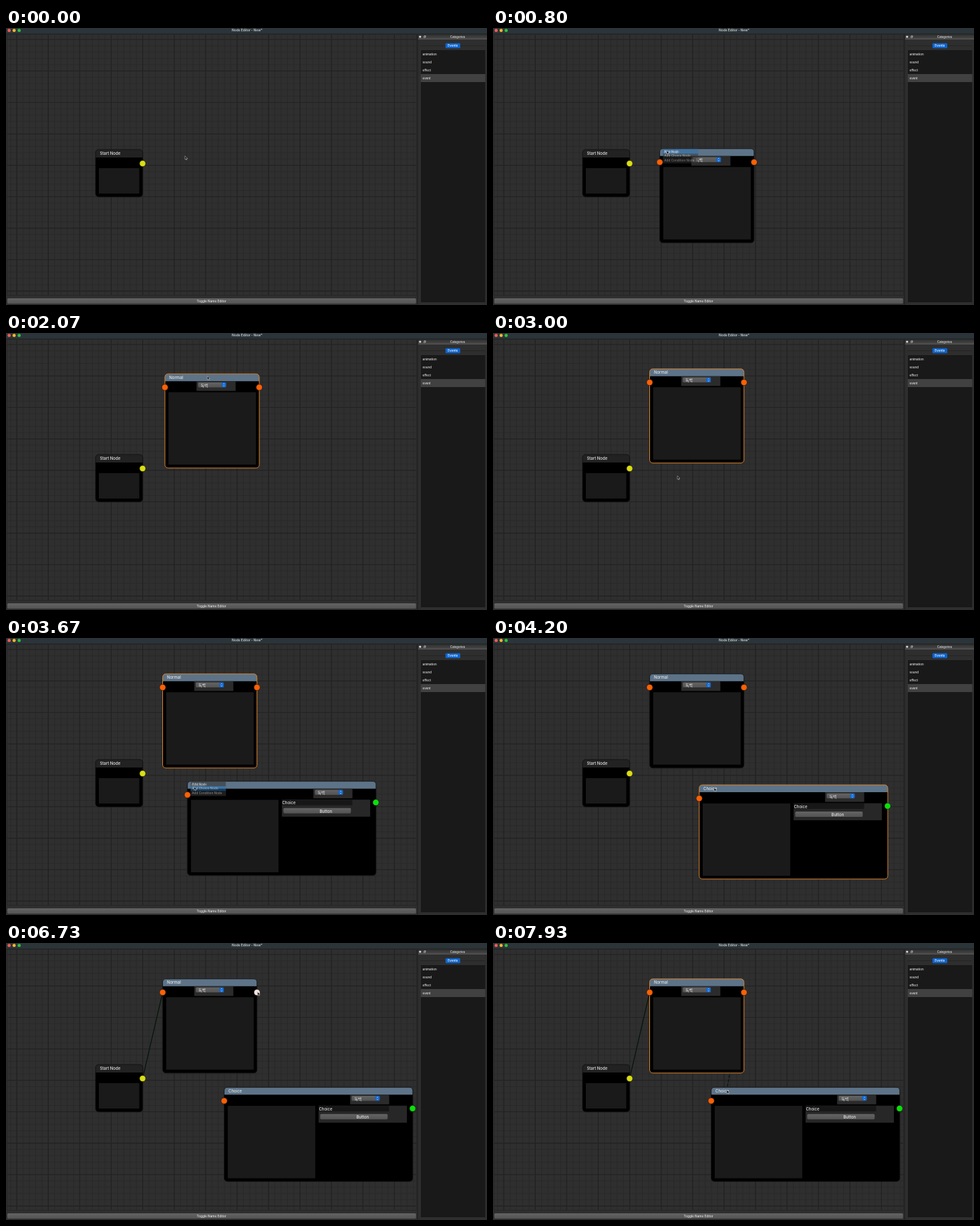
These frames come from a looping animation (720 by 415 pixels, 8 s). An HTML page:

```html
<!DOCTYPE html>
<html lang="en">
<head>
<meta charset="utf-8">
<title>Node Editor</title>
<style>
html, body { margin: 0; width: 100%; height: 100%; overflow: hidden; background: #2e2e2e; }
svg { display: block; width: 100vw; height: 100vh; }
text { font-family: Inter, "Noto Sans CJK KR", "Noto Sans CJK", sans-serif; font-size: 6px; font-weight: 500; fill: #e8e8e8; white-space: pre; }
.small { font-size: 4.7px; }
.mid { text-anchor: middle; }
.field { fill: #1a1a1a; }
.frame { fill: none; stroke: #111; stroke-width: .8; }
.selected .frame { stroke: #d9832b; stroke-width: 1; }
.socket { stroke: #171717; stroke-width: .6; }
.hover { fill: #fbe4df; }
.edge { stroke: #04140a; stroke-width: 1.2; }
</style>
</head>
<body>
<svg viewBox="0 0 720 415" preserveAspectRatio="none">
  <defs>
    <linearGradient id="button" x2="0" y2="1">
      <stop stop-color="#646464"/><stop offset="1" stop-color="#535353"/>
    </linearGradient>
    <linearGradient id="dock" x2="0" y2="1">
      <stop stop-color="#303030"/><stop offset="1" stop-color="#4c4c4c"/>
    </linearGradient>
    <clipPath id="view"><rect x="2" y="10" width="612" height="390"/></clipPath>
    <g id="combo">
      <rect width="58.5" height="14.5" fill="#2b2b2b"/>
      <rect x="2.3" y="1.7" width="42" height="7.6" rx="1.6" fill="url(#button)"/>
      <rect x="37.6" y="1.9" width="6.6" height="7.2" rx="1.5" fill="#0f65cf"/>
      <path d="M39.7 4.7l1.2-1.3 1.2 1.3M39.7 6.3l1.2 1.3 1.2-1.3" fill="none" stroke="#fff" stroke-width=".6"/>
      <text x="6.3" y="8.7" style="font-size:5.8px">독백</text>
    </g>
  </defs>

  <rect width="720" height="415" fill="#2e2e2e"/>
  <g clip-path="url(#view)">
    <rect x="2" y="10" width="612" height="390" fill="#2f2f2f"/>
    <path id="minor" stroke="#282828" stroke-width=".65"/>
    <path id="major" stroke="#222" stroke-width="1.1"/>
  </g>
  <path d="M1.5 400V9.5H614.5V400.5H1.5" fill="none" stroke="#262626"/>

  <line id="firstEdge" class="edge" x1="204.5" y1="203"/>
  <line id="secondEdge" class="edge" x1="375.5" y1="74" stroke-dasharray="4.6 2"/>

  <g id="start" transform="translate(134 182)">
    <rect width="70.7" height="71" rx="4.7"/>
    <path d="M0 12V4.7Q0 0 4.7 0H66Q70.7 0 70.7 4.7V12Z" fill="#222"/>
    <rect class="field" x="5" y="28" width="60.5" height="38"/>
    <rect class="frame" width="70.7" height="71" rx="4.7"/>
    <text x="6.4" y="8.2">Start Node</text>
    <circle id="startOut" class="socket" cx="70.5" cy="21" r="4.6" fill="#d9de12"/>
  </g>

  <g id="normal">
    <rect width="141.2" height="141" rx="4.7"/>
    <path d="M0 11V4.7Q0 0 4.7 0H136.5Q141.2 0 141.2 4.7V11Z" fill="#5d7388"/>
    <rect class="field" x="5.3" y="27.5" width="131" height="108.5"/>
    <use href="#combo" x="47.3" y="11"/>
    <rect class="frame" width="141.2" height="141" rx="4.7"/>
    <text x="6.4" y="7.6">Normal</text>
    <circle class="socket" cx="0" cy="20.2" r="4.6" fill="#fe6005"/>
    <circle id="normalOut" class="socket" cx="141.2" cy="20.2" r="4.6" fill="#fe6005"/>
  </g>

  <g id="choice">
    <rect width="282.3" height="141" rx="4.7"/>
    <path d="M0 11V4.7Q0 0 4.7 0H277.6Q282.3 0 282.3 4.7V11Z" fill="#5d7388"/>
    <rect class="field" x="5.3" y="27.8" width="131" height="108.5"/>
    <use href="#combo" x="188.5" y="11"/>
    <rect x="141.3" y="27.5" width="132.2" height="25.5" fill="#272727"/>
    <rect x="141.3" y="28" width="105.5" height="8" fill="#171717"/>
    <rect x="143.7" y="40" width="101" height="8" rx="1.6" fill="url(#button)"/>
    <rect class="frame" width="282.3" height="141" rx="4.7"/>
    <text x="6.4" y="7.6">Choice</text>
    <text x="141.8" y="34.7">Choice</text>
    <text class="mid" x="207.2" y="47">Button</text>
    <circle class="socket" cx="0" cy="20.3" r="4.6" fill="#fe6005"/>
    <circle class="socket" cx="282" cy="31.7" r="4.6" fill="#0be00b"/>
  </g>

  <g id="menu">
    <rect width="52.5" height="21.8" fill="#343434" stroke="#4a4a4a" stroke-width=".4"/>
    <rect id="highlight" width="52.5" height="6.8" fill="#2673b8"/>
    <text class="small" x="1.8" y="6">Add Node</text>
    <text class="small" x="1.8" y="12.8">Add Choice Node</text>
    <text class="small" x="1.8" y="19.5">Add Condition Node</text>
  </g>

  <rect width="720" height="8.5" fill="#2b3539"/>
  <rect y="8.5" width="720" height="1" fill="#1f2426"/>
  <circle cx="4.7" cy="3.7" r="2.4" fill="#fc5b53"/>
  <circle cx="12.2" cy="3.7" r="2.4" fill="#f8b72d"/>
  <circle cx="19.7" cy="3.7" r="2.4" fill="#2bc440"/>
  <text class="mid" x="361" y="5.3" style="font-size:4.9px;font-weight:700;fill:#b9bfc1">Node Editor - New*</text>

  <rect x="2" y="405" width="611.8" height="8" rx="1.6" fill="url(#button)"/>
  <text class="small mid" x="307.6" y="410.7">Toggle Name Editor</text>

  <rect x="615.5" y="9.5" width="1" height="405.5" fill="#1c1c1c"/>
  <rect x="617" y="10" width="103" height="7" fill="url(#dock)"/>
  <rect x="617" y="16.5" width="103" height=".6" fill="#666"/>
  <rect x="618.5" y="11.7" width="2.7" height="2.7" rx=".5" fill="#ddd"/>
  <path d="M625.5 12.5h2v2h-2zM626.2 12.3v-.7h2v2h-.6" fill="none" stroke="#ddd" stroke-width=".5"/>
  <text class="mid" x="676" y="14.8" style="font-size:4.2px">Categories</text>
  <rect x="620" y="26.3" width="96.5" height=".8" fill="#222"/>
  <rect x="657.8" y="22.8" width="22.2" height="7.4" rx="1.5" fill="#0e64cc"/>
  <text class="small mid" x="668.8" y="28.2" style="fill:#fff">Events</text>
  <rect x="620.8" y="32.8" width="97" height="378.5" fill="#191919" stroke="#3a3a3a" stroke-width=".5"/>
  <rect x="621" y="69" width="96.6" height="12" fill="#414141"/>
  <g id="list"></g>

  <path id="cursor" d="M0 0V5.2L1.2 4.1 2 6 2.9 5.6 2.1 3.8H3.8Z" fill="#050505" stroke="#ddd" stroke-width=".5"/>
</svg>
<script>
const $ = id => document.getElementById(id);
const LOOP = 8000;

function gridPath(step) {
  let d = '';
  for (let x = 16.2 - 47.1; x < 614; x += step) d += `M${x} 10V400`;
  for (let y = 17.3 - 47.1; y < 400; y += step) d += `M2 ${y}H614`;
  return d;
}
$('minor').setAttribute('d', gridPath(9.42));
$('major').setAttribute('d', gridPath(47.1));
$('list').innerHTML = ['animation', 'sound', 'effect', 'event']
  .map((name, i) => `<text x="623.6" y="${40.7 + 12 * i}" style="font-size:4.5px">${name}</text>`).join('');

// Pointer path: time, x, y
const pointer = [
  [0, 268, 191.8], [120, 268, 191.8], [300, 254, 180], [380, 254, 180], [560, 260, 183.5],
  [850, 260, 183.5], [1400, 313, 184.3], [1740, 313, 184.3], [2070, 301.3, 64.7],
  [2350, 297.9, 57.3], [2620, 297.9, 57.3], [3000, 276, 214], [3150, 276, 214],
  [3430, 281.5, 222.8], [3700, 281.5, 222.8], [3860, 294, 219], [3920, 294, 219],
  [4230, 332, 224.5], [4520, 349, 220.5], [4650, 349, 220.5], [5080, 204, 202.5],
  [5300, 204, 202.5], [5820, 234.5, 74], [6030, 234.5, 74], [6480, 380, 71],
  [6640, 376.5, 73.2], [7020, 376.5, 73.2], [7840, 350, 220.3], [LOOP, 350, 220.3]
];

function pointerAt(t) {
  const i = Math.max(1, pointer.findIndex(key => key[0] >= t));
  const [t0, x0, y0] = pointer[i - 1], [t1, x1, y1] = pointer[i];
  const u = (t - t0) / (t1 - t0), k = u * u * (3 - 2 * u);
  return [x0 + (x1 - x0) * k, y0 + (y1 - y0) * k];
}

const within = (t, from, to) => t >= from && t < to;
const show = (id, on) => { $(id).style.display = on ? '' : 'none'; };
const place = (id, [x, y]) => $(id).setAttribute('transform', `translate(${x} ${y})`);

// Position of a node carried by the pointer between two times
function dragged(t, from, to, [x, y]) {
  const a = pointerAt(from), b = pointerAt(Math.min(Math.max(t, from), to));
  return [x + b[0] - a[0], y + b[1] - a[1]];
}

function drawMenu(t) {
  const first = t < 2000;
  const [open, pick] = first ? [360, 720] : [3060, 3600];
  const y = first ? 180.5 : 214.5;
  show('menu', within(t, open, pick + 160));
  place('menu', [first ? 254.5 : 276.5, y]);
  $('menu').style.opacity = Math.min(1, 1 - (t - pick) / 160);
  const row = Math.floor((pointerAt(t)[1] - y - .8) / 6.8);
  show('highlight', row >= 0);
  $('highlight').setAttribute('y', .8 + row * 6.8);
}

function drawEdge(id, visible, [x, y]) {
  show(id, visible);
  $(id).setAttribute('x2', x);
  $(id).setAttribute('y2', y);
}

function draw(t) {
  const tip = pointerAt(t);
  place('cursor', tip);

  show('normal', t >= 720);
  place('normal', dragged(t, 1740, 2350, [249.6, 180.8]));
  show('choice', t >= 3600);
  place('choice', dragged(t, 3920, 4520, [271.6, 214.7]));

  $('start').classList.toggle('selected', within(t, 5300, 6000));
  $('normal').classList.toggle('selected', within(t, 1740, 3920) || t >= 7020);
  $('choice').classList.toggle('selected', within(t, 3920, 4750));
  $('startOut').classList.toggle('hover', within(t, 5050, 5380));
  $('normalOut').classList.toggle('hover', within(t, 6440, 7130));

  const linked = t >= 5960;
  drawEdge('firstEdge', t >= 5300, linked ? [234.5, 74] : tip);
  $('firstEdge').setAttribute('stroke-dasharray', linked ? 'none' : '4.6 2');
  drawEdge('secondEdge', t >= 7020, tip);
  drawMenu(t);
}

const begin = performance.now();
function tick() {
  draw((performance.now() - begin) % LOOP);
  requestAnimationFrame(tick);
}
tick();
</script>
</body>
</html>
```
